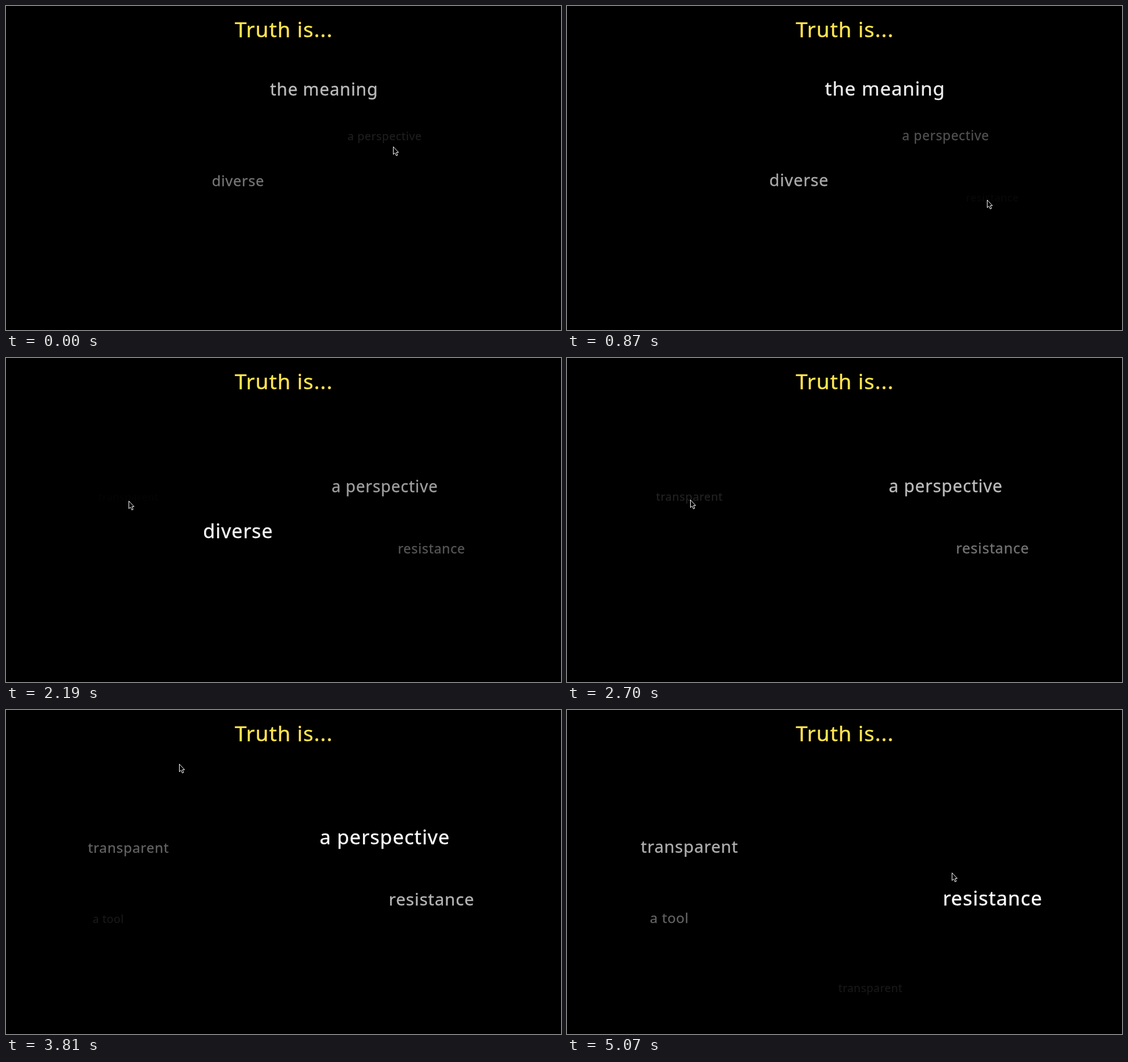
Write an HTML page with a canvas that moves like this. It is 978 px wide and 572 px high and loops after 5.1 s.

```html
<!DOCTYPE html>
<html lang="en">
<head>
<meta charset="utf-8">
<title>Truth is...</title>
<style>
  html, body { margin: 0; width: 100%; height: 100%; overflow: hidden; background: #000; }
  canvas { display: block; }
</style>
</head>
<body>
<canvas id="stage" width="978" height="572"></canvas>
<script>
const ctx = document.getElementById('stage').getContext('2d');
const LOOP = 5100, STEP = 30, LIFE = 4375;

// each word grows and brightens from the moment of the click that made it
const words = [
  { text: 'the meaning', x: 560, y: 158, t: -3200 },
  { text: 'diverse', x: 408.5, y: 318, t: -2020 },
  { text: 'a perspective', x: 667, y: 237, t: -515 },
  { text: 'resistance', x: 749.5, y: 345, t: 710 },
  { text: 'transparent', x: 215.5, y: 252, t: 2100 },
  { text: 'a tool', x: 180, y: 376, t: 3385 },
  { text: 'transparent', x: 534.5, y: 498, t: 4660 }
];

// the pointer visits every click and a few turning points between them
const turns = [
  { x: 682, y: 248, t: 0 },
  { x: 740, y: 342, t: 870 },
  { x: 690, y: 368, t: 1120 },
  { x: 225, y: 262, t: 1650 },
  { x: 217, y: 250, t: 2700 },
  { x: 330, y: 38, t: 3960 },
  { x: 536, y: 496, t: 4320 },
  { x: 678, y: 287, t: 5070 }
];
const stops = [...turns, ...words.filter(w => w.t > 0)].sort((a, b) => a.t - b.t);

const arrow = new Path2D('M0.5 0.5V14L3.5 11.3L5.7 16.3L8 15.3L5.9 10.4H9.7Z');

function drawText(text, x, y, size, color) {
  const gap = size * 0.03;
  ctx.font = `${size}px "Noto Sans", "Open Sans", sans-serif`;
  ctx.letterSpacing = gap + 'px';
  ctx.textAlign = 'center';
  ctx.fillStyle = ctx.strokeStyle = color;
  ctx.lineWidth = size * 0.012;
  ctx.fillText(text, x + gap / 2, y);
  ctx.strokeText(text, x + gap / 2, y);
}

function drawWord(word, time) {
  const age = time - word.t;
  if (age < 0 || age > LIFE) return;
  const c = Math.min(255, Math.round(age * 0.0585));
  drawText(word.text, word.x, word.y, 17.75 + age * 0.0039, `rgb(${c},${c},${c})`);
}

function drawPointer(time) {
  const i = Math.max(1, stops.findIndex(s => s.t >= time));
  const a = stops[i - 1], b = stops[i];
  const u = (time - a.t) / (b.t - a.t), k = u * u * (3 - 2 * u);
  ctx.save();
  ctx.translate(Math.round(a.x + (b.x - a.x) * k), Math.round(a.y + (b.y - a.y) * k));
  ctx.fillStyle = '#000';
  ctx.strokeStyle = '#fff';
  ctx.lineWidth = 1;
  ctx.fill(arrow);
  ctx.stroke(arrow);
  ctx.restore();
}

const start = performance.now();

function draw() {
  const elapsed = Math.max(0, performance.now() - start) % LOOP;
  const time = Math.floor(elapsed / STEP) * STEP;
  ctx.fillStyle = '#000';
  ctx.fillRect(0, 0, 978, 572);
  drawText('Truth is...', 489, 55, 37.2, '#ffe44f');
  words.forEach(w => drawWord(w, time));
  drawPointer(time);
  requestAnimationFrame(draw);
}
draw();
</script>
</body>
</html>
```
